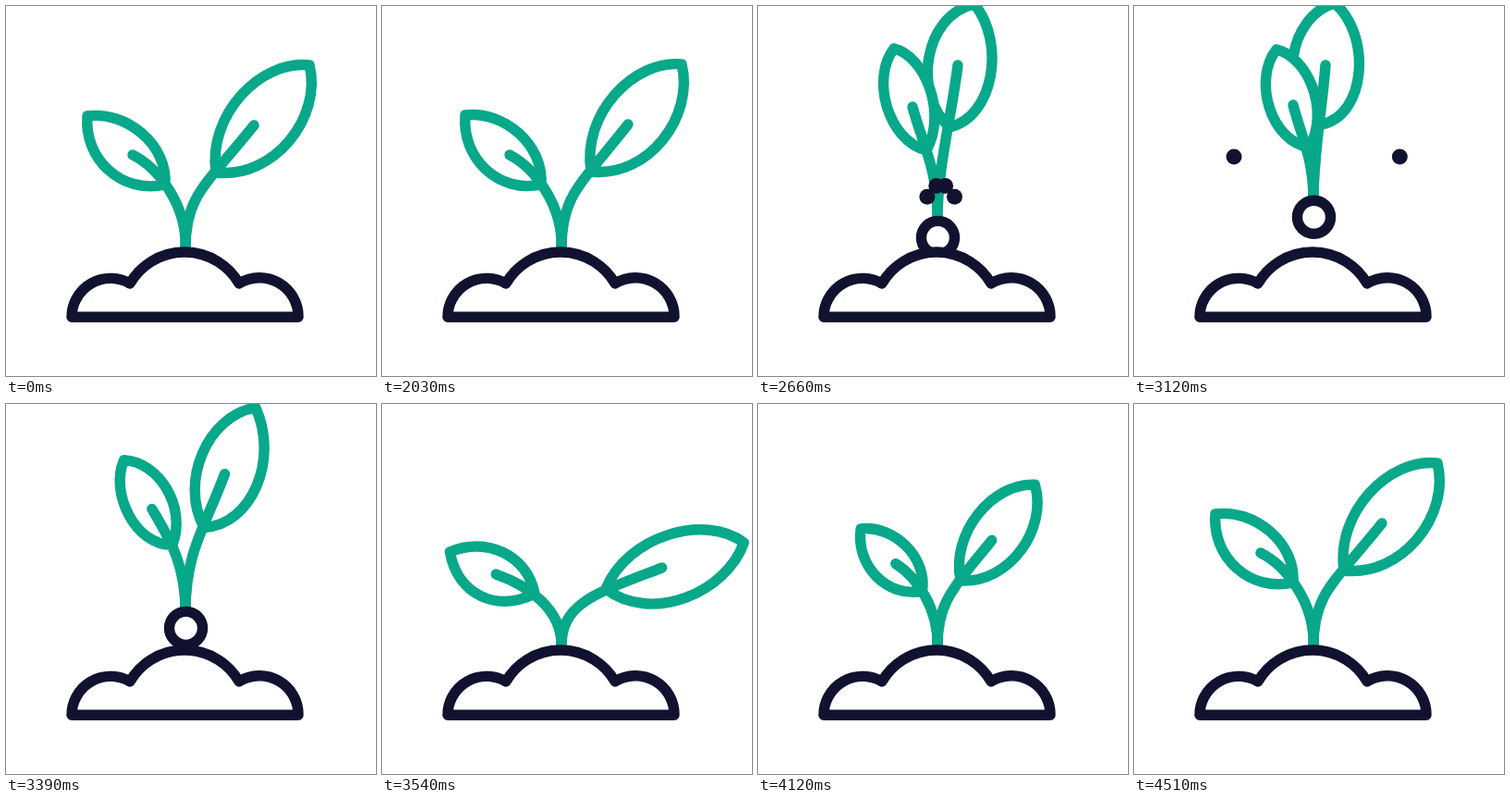
An HTML page without scripts that plays this animation: 400 px wide and 400 px high, repeating every 4.54 s.

```html
<!DOCTYPE html>
<html lang="en">
<head>
<meta charset="utf-8">
<title>Sprout</title>
<style>
  html, body { margin: 0; width: 100%; height: 100%; overflow: hidden; background: #fff; }
  svg { display: block; width: 100%; height: 100%; }
  :root { --loop: 4540ms; }
  path, .seed { fill: #fff; stroke-width: 11.4; stroke-linecap: round; stroke-linejoin: round; }
  .ground, .seed { stroke: #11122f; }
  .sprout { stroke: #08a88a; animation: var(--loop) linear infinite; }
  .left { animation-name: left; }
  .right { animation-name: right; }
  .seed { animation: hop var(--loop) linear infinite; }
  .dirt circle { fill: #11122f; r: 0; animation: var(--loop) linear infinite; animation-name: drift, lob, far; }
  .dirt .near { animation-name: drift, lob, near; }

  /* Each pose holds one leaf, then its vein and stem. */
  @keyframes left {
    0%, 44.69% { d: path("M88 119C130 113 175 150 172 193C125 204 84 165 88 119ZM137 161C165 175 196 216 194 262"); }
    44.71% { d: path("M90 118C132 113 175 150 172 193C125 203 86 164 90 118ZM138 161C165 175 196 216 194 262"); animation-timing-function: cubic-bezier(.45, .1, .6, 1); }
    58.59% { d: path("M147 46C180 54 205 115 182 156C140 145 122 78 147 46ZM167 109C178 150 194 175 194 230"); }
    68.72% { d: path("M154 47C187 55 212 110 190 153C148 147 128 80 154 47ZM172 107C182 145 194 165 194 210"); animation-timing-function: cubic-bezier(.33, 0, .67, .33); }
    74.67% { d: path("M128 60C165 62 196 110 180 152C140 153 112 95 128 60ZM158 113C175 143 194 170 194 224"); }
    77.97% { d: path("M73 160C112 143 157 163 165 205C122 226 81 205 73 160ZM123 184C158 196 195 222 194 262"); }
    83.26% { d: path("M164 171C185 172 202 200 190 224C168 222 154 192 164 171ZM176 199C188 215 194 235 194 262"); animation-timing-function: cubic-bezier(.3, .2, .4, 1); }
    99.34%, 100% { d: path("M88 119C130 113 175 150 172 193C125 204 84 165 88 119ZM137 161C165 175 196 216 194 262"); }
  }
  @keyframes right {
    0%, 44.69% { d: path("M328 64C275 58 218 118 227 180C290 187 342 120 328 64ZM268 129C215 195 194 205 194 262"); }
    44.71% { d: path("M324 63C272 58 216 117 226 179C288 186 338 119 324 63ZM266 128C214 194 194 205 194 262"); animation-timing-function: cubic-bezier(.45, .1, .6, 1); }
    58.59% { d: path("M234 -2C179 10 167 95 207 131C255 120 268 40 234 -2ZM216 64C210 115 194 175 194 230"); }
    68.72% { d: path("M217 -3C168 10 151 95 203 128C251 118 257 32 217 -3ZM207 64C203 115 194 160 194 210"); animation-timing-function: cubic-bezier(.33, 0, .67, .33); }
    74.67% { d: path("M269 3C216 12 187 85 214 133C265 130 295 60 269 3ZM236 75C214 135 194 160 194 224"); }
    77.97% { d: path("M392 150C350 118 266 142 242 200C292 238 373 204 392 150ZM303 177C230 205 194 215 194 262"); }
    83.26% { d: path("M234 140C203 147 186 190 201 216C232 210 248 167 234 140ZM218 189C200 211 194 235 194 262"); animation-timing-function: cubic-bezier(.3, .2, .4, 1); }
    99.34%, 100% { d: path("M328 64C275 58 218 118 227 180C290 187 342 120 328 64ZM268 129C215 195 194 205 194 262"); }
  }
  @keyframes hop {
    0%, 44.71% { cy: 292px; }
    55% { cy: 280px; }
    58.59% { cy: 250.5px; animation-timing-function: cubic-bezier(.33, .67, .67, 1); }
    67.8% { cy: 228px; animation-timing-function: cubic-bezier(.33, 0, .67, .33); }
    74.67% { cy: 242px; }
    77.97%, 100% { cy: 292px; }
  }
  @keyframes drift {
    0%, 56.61% { cx: 197.7px; }
    71.37%, 100% { cx: calc(197.7px + var(--dx)); }
  }
  @keyframes lob {
    0%, 56.61% { cy: 235px; animation-timing-function: cubic-bezier(.33, .67, .67, 1); }
    66.28% { cy: var(--peak); animation-timing-function: cubic-bezier(.33, 0, .67, .33); }
    71.37%, 100% { cy: calc(var(--peak) + 21px); }
  }
  @keyframes far {
    0%, 56.6% { r: 0; }
    56.61%, 68.75% { r: 8.5px; }
    71.37%, 100% { r: 0; }
  }
  @keyframes near {
    0%, 56.6% { r: 0; }
    56.61%, 64% { r: 8.5px; }
    67%, 100% { r: 0; }
  }
</style>
</head>
<body>
<svg viewBox="0 0 400 400">
  <path class="sprout right" d="M328 64C275 58 218 118 227 180C290 187 342 120 328 64ZM268 129C215 195 194 205 194 262"/>
  <path class="sprout left" d="M88 119C130 113 175 150 172 193C125 204 84 165 88 119ZM137 161C165 175 196 216 194 262"/>
  <circle class="seed" cx="194.5" cy="292" r="18"/>
  <g class="dirt">
    <circle style="--dx:-109px;--peak:158px"/>
    <circle class="near" style="--dx:-36px;--peak:127px"/>
    <circle class="near" style="--dx:36px;--peak:127px"/>
    <circle style="--dx:109px;--peak:158px"/>
  </g>
  <path class="ground" d="M71 336.3A42 42 0 0 1 134 300A68.2 68.2 0 0 1 252 300A42 42 0 0 1 316 336.3Z"/>
</svg>
</body>
</html>
```
